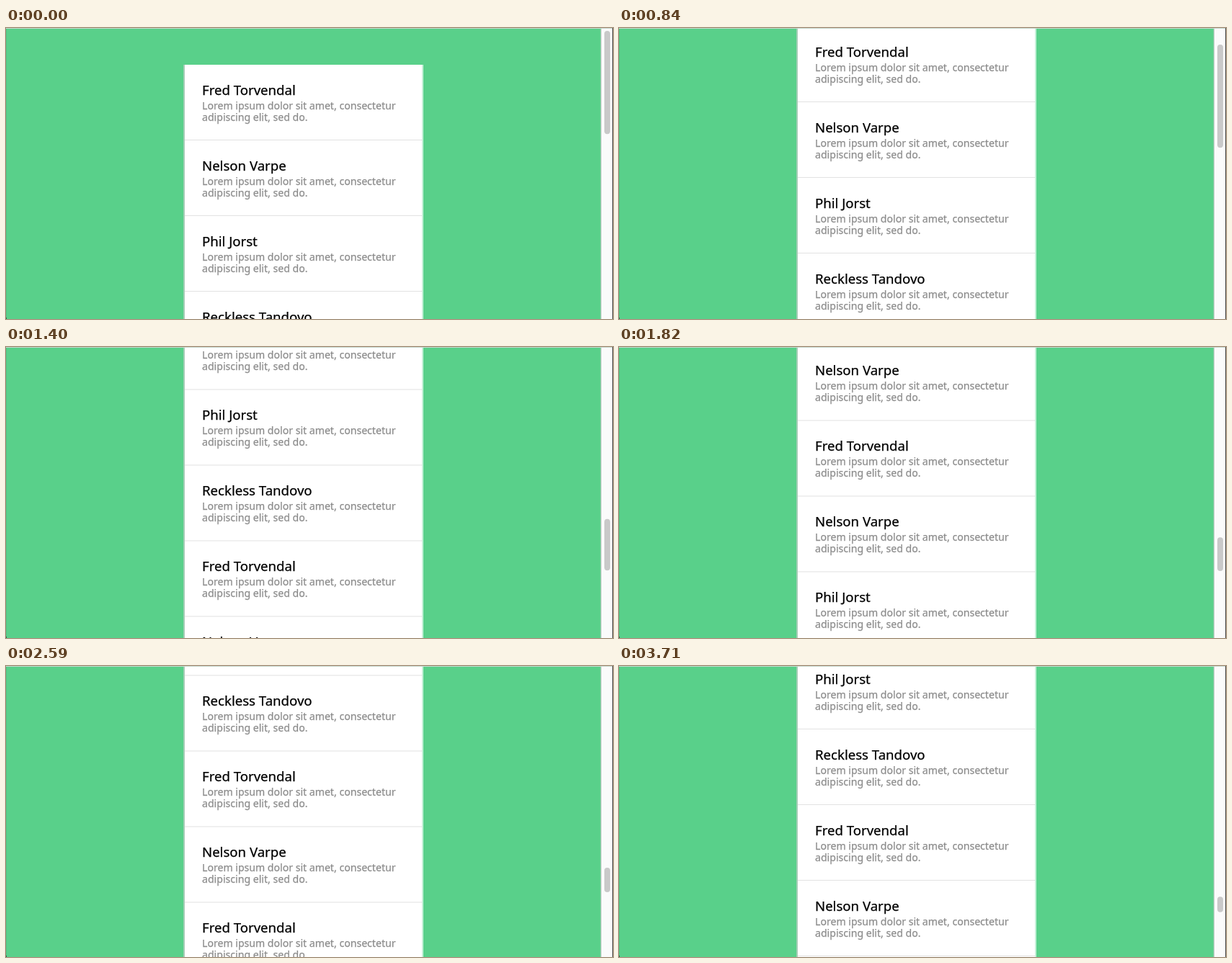
These frames come from a looping animation (842 by 404 pixels, 3920 ms). An HTML page with a canvas:

```html
<!DOCTYPE html>
<html lang="en">
<head>
<meta charset="utf-8">
<title>Infinite scroll</title>
<style>
  html, body { margin: 0; width: 100%; height: 100%; overflow: hidden; background: #59d08a; }
  canvas { display: block; }
</style>
</head>
<body>
<canvas id="stage" width="842" height="404"></canvas>
<script>
const ctx = document.getElementById('stage').getContext('2d');
const W = 842, H = 404;
const LOOP = 3920, TICK = 70;
const CARD = { x: 248, y: 51, w: 330 };
const ROW = 105, BATCH = 10;
const NAMES = ['Fred Torvendal', 'Nelson Varpe', 'Phil Jorst', 'Reckless Tandovo'];
const LINES = ['Lorem ipsum dolor sit amet, consectetur', 'adipiscing elit, sed do.'];
const FAMILY = '"Noto Sans", "Open Sans", sans-serif';

// Each flick: start time, then the scroll offset after every tick.
const FLICKS = [
  [560, [3, 10, 22, 37, 53, 160, 420, 698]],
  [1260, [800, 1060, 1251.5]],
  [1610, [1360, 1680, 1930, 2048.5]],
  [2100, [2110, 2330, 2600, 2760, 2798]],
  [2590, [2872.5, 3250, 3560]],
  [3080, [3743.5, 4250, 4700, 4898]]
];

function scrollAt(t) {
  let offset = 0;
  for (const [start, stops] of FLICKS) {
    if (t < start) break;
    const step = Math.floor((t - start) / TICK);
    offset = stops[Math.min(step, stops.length - 1)];
  }
  return offset;
}

// Another batch is appended whenever the bottom of the list is reached.
const batchesAt = scroll => 1 + Math.floor((scroll + H - CARD.y) / (ROW * BATCH));

function rect(color, x, y, w, h) {
  ctx.fillStyle = color;
  ctx.fillRect(x, y, w, h);
}

// A hairline stroke gives the slightly heavier text smoothing.
function text(str, y, size, color) {
  ctx.font = `${size}px ${FAMILY}`;
  ctx.fillStyle = ctx.strokeStyle = color;
  ctx.lineWidth = 0.25;
  ctx.fillText(str, CARD.x + 24, Math.floor(y));
  ctx.strokeText(str, CARD.x + 24, Math.floor(y));
}

function drawRow(index, y) {
  text(NAMES[index % BATCH % NAMES.length], y + 42, 18.6, '#000');
  LINES.forEach((line, i) => text(line, y + 62 + i * 16, 14.1, '#8c8c8c'));
  rect('#e2e2e2', CARD.x, y + ROW - 1, CARD.w - 1, 1);
}

function drawList(scroll, batches) {
  const top = CARD.y - scroll;
  const y = Math.max(top, 0);
  rect('#a5cdb6', CARD.x - 2, y, 2, H - y);
  rect('#fff', CARD.x, y, CARD.w, H - y);
  rect('#c2f0d6', CARD.x + CARD.w - 1, y, 2, H - y);

  const first = Math.max(0, Math.floor(-top / ROW));
  for (let i = first; i < batches * BATCH && top + i * ROW < H; i++) {
    drawRow(i, top + i * ROW);
  }
}

function drawScrollbar(scroll, batches) {
  rect('#78d09c', 824, 0, 1, H);
  rect('#bccbc3', 825, 0, 1, H);
  rect('#fbfbfb', 826, 0, 15, H);
  const length = 162000 / (ROW * BATCH * batches + 50) - 4;
  const y = 4 + scroll / (2.54 * batches + 0.25);
  ctx.fillStyle = '#c9c9c9';
  ctx.beginPath();
  ctx.roundRect(830, y, 8, length, 4);
  ctx.fill();
}

function drawFrame() {
  rect('#c8d8ce', 0, 0, W, 1);
  rect('#4a4a4a', W - 1, 0, 1, H);
  rect('#55bd80', 0, 1, 1, H - 1);
  rect('#2f5d43', 0, H - 2, 1, 2);
}

function draw(t) {
  const scroll = scrollAt(t);
  const batches = batchesAt(scroll);
  rect('#59d08a', 0, 0, W, H);
  drawList(scroll, batches);
  drawScrollbar(scroll, batches);
  drawFrame();
}

const origin = performance.now();
function tick() {
  draw((performance.now() - origin) % LOOP);
  requestAnimationFrame(tick);
}
tick();
</script>
</body>
</html>
```
